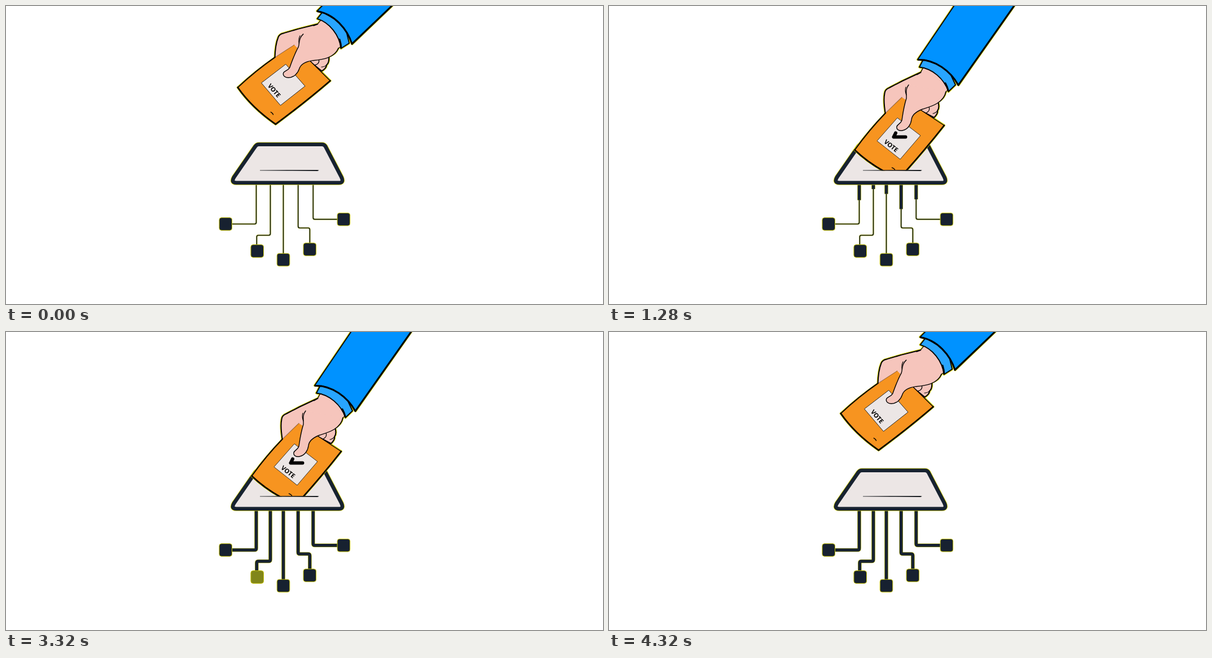
Write an HTML page that moves like this. It is 1058x529 px and loops after 4360 ms.

```html
<!DOCTYPE html>
<html lang="en">
<head>
<meta charset="utf-8">
<title>Digital vote</title>
<style>
  html, body { margin: 0; width: 100%; height: 100%; overflow: hidden; background: #fff; }
  svg { display: block; width: 100vw; height: 100vh; }
  path { stroke-linejoin: round; }
  .line { fill: none; stroke: #000; stroke-linecap: round; }
  .fringe { fill: none; stroke: #d2cd00; }
  .label { font: 700 11px "Open Sans", "Noto Sans", sans-serif; text-anchor: middle; }
</style>
</head>
<body>
<svg viewBox="0 0 1058 529">
  <defs>
    <clipPath id="aboveSlot"><rect width="1058" height="292.3"/></clipPath>
    <path id="sleeve" d="M679 -100 L547 95 C578 94 606 116 619.5 140.5 L788 -100 Z"/>
    <path id="cuff" d="M557 95 L550 108.5 C573 111 594 129 601.5 152 L614 140 L600 110 Z"/>
    <path id="fingers" d="M553 117.5 L520 133 L497 145 Q489 148 488.5 155 C486.5 165 488 180 490 192 L519 190
      L553 186 L576 198 C580 194 583 190 582 186 C585 182 585 176 583 170 C592 165 595 160 597 152 L608 138 L562 101 Z"/>
    <path id="card" d="M435.5 255.5 Q470 208 519 162 L594 212 Q558 258 514 306.5 Q467 286 435.5 255.5 Z"/>
    <path id="tray" d="M448 245.8 H560 Q564 245.8 566 249 L594.5 304 Q599 313.7 590 313.7 H408 Q398.5 313.7 404 304 L442 249 Q444.5 245.8 448 245.8 Z"/>
    <path id="thumb" d="M531 140 C524 149 528 157 527 164 C522 180 521 190 519 203 C517 209 511 210 510 214
      C509 220 515 222 520 221 C530 219 535 210 536 202 C537 193 545 187 556 183 C572 178 593 172 597 152"/>
  </defs>

  <g id="circuit"></g>
  <use href="#tray" class="fringe" stroke-width="8.2"/>
  <use href="#tray" fill="#ece6e5" stroke="#172230" stroke-width="6.6"/>

  <g clip-path="url(#aboveSlot)">
    <g id="arm">
      <g class="fringe" stroke-width="4">
        <use href="#sleeve"/><use href="#cuff"/><use href="#fingers"/><use href="#card"/>
      </g>
      <use href="#fingers" fill="#f6c5bc" stroke="#000" stroke-width="2"/>
      <path class="line" stroke-width="1.2" d="M567 179 Q570 186 562 190 M582 186 Q579 190 574 191"/>

      <use href="#card" fill="#f79420"/>
      <path class="line" stroke-width="2" d="M435.5 255.5 Q461 220 490 190"/>
      <path class="line" stroke-width="1.2" d="M490 190 L519 162" opacity=".35"/>
      <path class="line" stroke-width="1.4" d="M553 185 L594 212"/>
      <path class="line" stroke-width="2.6" d="M594 212 Q558 258 514 306.5 Q467 286 435.5 255.5"/>
      <path class="line" stroke-width="1.4" d="M501.5 287 Q505 288 506.5 290.5"/>

      <path d="M475 239.5 L511 198.5 L552 230 L516 272 Z" fill="#ece6e5" stroke="#222" stroke-width=".9"/>
      <text class="label" transform="translate(500 248.2) rotate(38.5)" y="4">VOTE</text>
      <path id="check" class="line" stroke-width="6" d="M508 225.5 L504.5 232.5 L525.5 232.5"/>

      <path fill="#f6c5bc" d="M553 118 L531 140 L560 178 L597 152 L608 138 L562 101 Z"/>
      <use href="#thumb" fill="#f6c5bc"/>
      <use href="#thumb" class="line" stroke-width="1.4"/>
      <path class="line" stroke-width="1.2" d="M526 144 Q524 151 527 158 M546 122 L553 118"/>

      <use href="#cuff" fill="#28a5ff" stroke="#000" stroke-width="1.8"/>
      <path class="line" stroke-width="3" d="M596 137 Q600 144 601.5 151"/>
      <use href="#sleeve" fill="#0092ff" stroke="#000" stroke-width="1.8"/>
      <path class="line" stroke-width="3" d="M548 95.5 C578 94.5 606 116 619 140.5 L788 -100"/>
    </g>
  </g>
  <path fill="#15181c" d="M450 291.6 L500 291 L552 290.9 L555 291.8 L552 293 L500 292.5 L450 292.3 Z"/>
</svg>

<script>
const LOOP = 4360, STEP = 40;
const DARK = [23, 33, 48], GLOW = [255, 255, 0];
const BOX = 22.6;

// path, box centre, fill start and end, blink start
const wires = [
  { d: 'M443.5 316 V384 q0 3 -3 3 H396', box: [389.2, 387], fill: [1000, 2150], blink: 2170 },
  { d: 'M468.5 316 V404 q0 3 -3 3 H447.3 q-3 0 -3 3 V426', box: [445.2, 435], fill: [1170, 2800], blink: 2780 },
  { d: 'M491.5 316 V442', box: [491.5, 450.5], fill: [1170, 1960], blink: 2520 },
  { d: 'M517.7 316 V391 q0 3 3 3 H535.4 q3 0 3 3 V423', box: [538.3, 432], fill: [1000, 1790], blink: 1790 },
  { d: 'M544.3 316 V375.7 q0 3 3 3 H591.5', box: [598.4, 378.7], fill: [1000, 2120], blink: 2170 }
];
const BLINK = 700;

const $ = id => document.getElementById(id);
const clamp = x => Math.min(1, Math.max(0, x));
const ramp = (t, a, b) => clamp((t - a) / (b - a));
const smooth = x => x * x * (3 - 2 * x);

function add(parent, tag, attrs) {
  const el = document.createElementNS('http://www.w3.org/2000/svg', tag);
  for (const key in attrs) el.setAttribute(key, attrs[key]);
  return parent.appendChild(el);
}

function addWire(d, width, rim) {
  const g = add($('circuit'), 'g', { fill: 'none' });
  add(g, 'path', { d, class: 'fringe', 'stroke-width': width + rim });
  const core = add(g, 'path', { d, stroke: '#172230', 'stroke-width': width });
  return { g, length: core.getTotalLength() };
}

for (const w of wires) {
  addWire(w.d, 1.7, 0.7);
  w.thick = addWire(w.d, 5.6, 1);
}
for (const w of wires) {
  w.el = add($('circuit'), 'rect', {
    x: w.box[0] - BOX / 2, y: w.box[1] - BOX / 2, width: BOX, height: BOX,
    rx: 4, stroke: '#c8c405', 'stroke-width': 1
  });
}

const check = $('check');
const checkLength = check.getTotalLength();

function drawPart(el, length, part) {
  el.style.visibility = part > 0 ? 'visible' : 'hidden';
  el.style.strokeDasharray = `${length * part} 999`;
}

// Below half strength a box drops out; above it, it tints towards yellow.
function paintBox(el, strength) {
  el.style.visibility = strength < 0.5 ? 'hidden' : 'visible';
  const rgb = DARK.map((c, i) => Math.round(GLOW[i] + (c - GLOW[i]) * strength));
  el.setAttribute('fill', `rgb(${rgb})`);
}

function render(t) {
  const up = 1 - smooth(ramp(t, 30, 1080)) + smooth(ramp(t, 3350, 4030));
  $('arm').setAttribute('transform',
    `translate(${-0.8 * up} ${-44.9 * up}) rotate(${11.2 * up} 760 100)`);
  drawPart(check, checkLength, ramp(t, 980, 1180) - ramp(t, 3780, 3960));
  for (const w of wires) {
    drawPart(w.thick.g, w.thick.length, ramp(t, ...w.fill));
    paintBox(w.el, Math.abs(1 - 2 * ramp(t, w.blink, w.blink + BLINK)));
  }
}

const start = performance.now();
function tick() {
  const t = (performance.now() - start) % LOOP;
  render(Math.floor(t / STEP) * STEP);
  requestAnimationFrame(tick);
}
tick();
</script>
</body>
</html>
```
